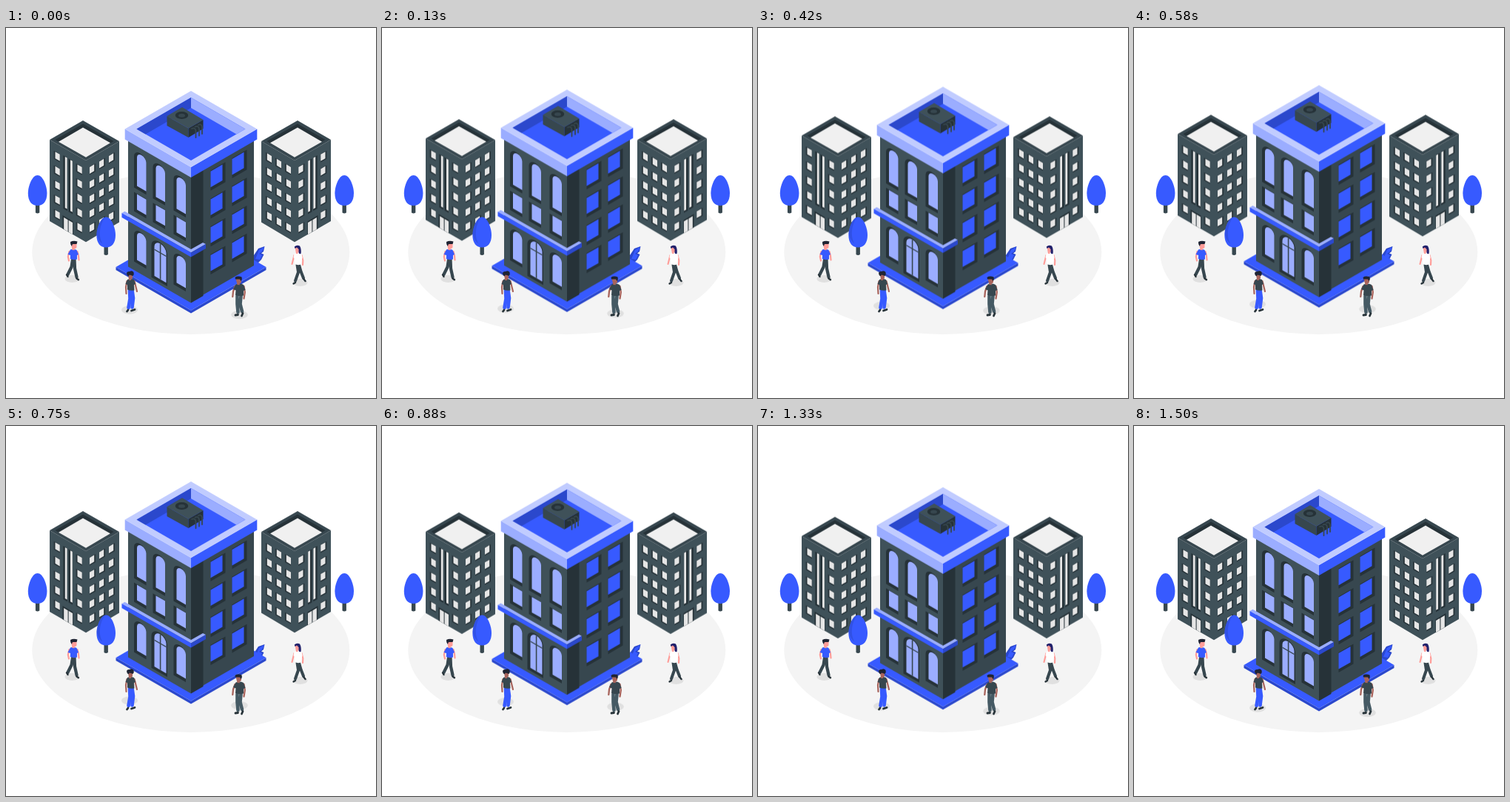
An HTML page for the animation above (1.54 s loop, 500 by 500 pixels).

```html
<!DOCTYPE html>
<html lang="en">
<head>
<meta charset="utf-8">
<title>City block</title>
<style>
  html, body { margin: 0; width: 100%; height: 100%; overflow: hidden; background: #fff; }
  svg { display: block; width: 100%; height: 100%; }
  #float { animation: float 1540ms linear infinite; }
  @keyframes float {
    0%, 97.4%, 100% { transform: translateY(0); }
    48.7% { transform: translateY(-10px); }
  }
  .blue { fill: #375aff; }
  .navy { fill: #2b48cc; }
  .pale { fill: #c1ccff; }
  .soft { fill: #9badff; }
  .wall { fill: #37474f; }
  .stone { fill: #3f5159; }
  .dark { fill: #263238; }
  .glass { fill: #e6e6e6; }
  .roof { fill: #f0f0f0; }
  .shade { fill: #e0e0e0; }
  .pink { fill: #ff9c98; }
  .tan { fill: #a8645c; }
  .white { fill: #fff; }
  .hair { fill: #1f2433; }
  .limb { fill: none; stroke-linecap: round; stroke-linejoin: round; }
</style>
</head>
<body>
<svg viewBox="0 0 500 500">
  <defs>
    <g id="tree">
      <path class="wall" d="M-2.700 30h5.400v20.500q-2.700 2-5.400 0z"/>
      <path class="blue" d="M0 0C7 0 12.800 14 12.800 24.500C12.800 35.500 7.500 41 0 41S-12.800 35.500-12.800 24.500C-12.800 14-7 0 0 0z"/>
    </g>
  </defs>

  <ellipse cx="249.800" cy="303" rx="214.500" ry="111" fill="#f4f4f4"/>
  <use href="#tree" x="42.600" y="199"/>
  <use href="#tree" x="457.200" y="199"/>
  <path class="navy" d="M335 318V307L341 298L349.500 295L348 302L345 304.500L348.500 306L345 313L340 318z"/>
  <path class="blue" d="M337 312L342 300L349 296L346 302L342 305L346 307L343 313z"/>

  <g id="float">
    <ellipse class="shade" cx="167" cy="381" rx="11" ry="5.700"/>
    <ellipse class="shade" cx="315.500" cy="387.500" rx="11.300" ry="5.700"/>
    <g id="west"></g>
    <g id="east" transform="translate(498) scale(-1 1)"></g>

    <path class="navy" d="M148.500 323L250 381.500L351.500 323V327L250 385.500L148.500 327z"/>
    <path class="blue" d="M148.500 323L250 264.500L351.500 323L250 381.500z"/>
    <path class="stone" d="M165 150L250 199V371.500L165 322.500z"/>
    <path class="wall" d="M250 199L335 150V321L250 370z"/>
    <path class="dark" d="M250 199L266.500 189.500V362L250 371.500z"/>
    <g id="front" transform="matrix(1 .577 0 1 165 152)"></g>
    <g id="side" transform="matrix(1 -.577 0 1 250 201)"></g>

    <path class="soft" d="M156.500 250L160.500 247.700L250 299L266 290L270 292L250 303.500z"/>
    <path class="blue" d="M156.500 250L250 303.500V309.500L156.500 256z"/>
    <path class="navy" d="M250 303.500L270 292V298L250 309.500z"/>

    <path class="soft" d="M160.700 136.500L250 188V202L160.700 150.500z"/>
    <path class="blue" d="M250 188L339.300 136.500V150.500L250 202z"/>
    <path class="pale" d="M250 85L339.300 136.500L250 188L160.700 136.500z"/>
    <path class="blue" d="M250 94L323.500 136.500L250 179L176.500 136.500z"/>
    <path class="navy" d="M250 94V108L188.600 143.500L176.500 136.500z"/>
    <path class="soft" d="M250 94L323.500 136.500L311.400 143.500L250 108z"/>

    <path class="wall" d="M217.500 119L246.500 135.500V148L217.500 132z"/>
    <path class="dark" d="M246.500 135.500L266.500 124V136L246.500 148z"/>
    <path class="stone" d="M238 107L266.500 124L246.500 135.500L217.500 119z"/>
    <ellipse class="dark" cx="237.500" cy="118" rx="8.700" ry="5"/>
    <ellipse class="wall" cx="237.500" cy="118.300" rx="4.500" ry="2.500"/>
    <path class="limb" stroke="#37474f" stroke-width="1.800"
      d="M251 136q5-2 5.500 3v9M255.500 133.500q5-2 5.500 3v9M260 131q4.500-2 5 3v9"/>
  </g>

  <use href="#tree" x="135.200" y="255.500"/>
  <path class="navy" d="M134 255.700C127 258 123 270 122.600 278C124 285 128 290 130 291C124 280 127 264 134 255.700z" opacity=".5"/>

  <g>
    <ellipse class="shade" cx="89.500" cy="339" rx="10" ry="5"/>
    <path class="limb" stroke="#ff9c98" stroke-width="2.200" d="M85.500 302L83.800 309L85 314.500M96.500 302L98 308L98.500 313.500"/>
    <path class="limb" stroke="#37474f" stroke-width="4.200" d="M90 313L88.500 323L83.500 333M92.500 313L93 325L95.500 336.500"/>
    <path class="limb" stroke="#263238" stroke-width="2.400" d="M82 333.500L83.500 336M95.500 338.500L98 340.200"/>
    <path class="blue" d="M87 299.500Q91 298 95.500 300L98 306L96 307V312.500Q91 314 86.800 312L87 307L83.500 306z"/>
    <path class="pink" d="M88 291h7.500v5.500q-1 2-2.800 1.800v2l-3.200-.3z"/>
    <path class="hair" d="M87 289Q91 287 96.500 288.500L95.500 292H90L88.800 295Q86.500 292 87 289z"/>
  </g>

  <g>
    <path class="limb" stroke="#a8645c" stroke-width="2.200" d="M163.500 342L162 350L162.500 359M173.500 342L175.300 349L177 356"/>
    <path class="limb" stroke="#375aff" stroke-width="4.600" d="M167 354L167.500 366L165.500 378M170.500 354L172 365L170.500 377.500"/>
    <path class="limb" stroke="#263238" stroke-width="2.800" d="M165 381L163.500 383M169.500 382L174 380.500"/>
    <path class="wall" d="M164 340Q168 338 173 340L175 346L173 347L173.500 354.500Q168 355.500 164 353.500L164 347L161.500 346z"/>
    <path class="tan" d="M165 333h6v5q-.8 1.500-2 1.500v1.500h-2.800z"/>
    <path class="hair" d="M163 331Q164 328.500 167 329Q170.500 327 172.500 330Q173.500 333 171.500 335L167 333.500L165.500 335.500Q163 334 163 331z"/>
  </g>

  <g>
    <path class="limb" stroke="#a8645c" stroke-width="2.300" d="M309.500 349L307 356L306.300 363M321.500 349L322.800 357L321.500 365.500"/>
    <path class="limb" stroke="#455a64" stroke-width="4.600" d="M312.500 362L312.500 373L313.500 384M317.500 362L316.500 373L319 383"/>
    <path class="limb" stroke="#263238" stroke-width="2.800" d="M313.500 387.500L310 388M320 385.500L318.500 389"/>
    <path class="wall" d="M310.500 346.500Q316 344.500 321 347L323.500 354L321 355V361.500Q315 363 310 361L310.500 354.500L307 353z"/>
    <path class="tan" d="M310.500 338.500h7.500v5q-.8 1.800-2.200 1.800v2l-3.300-.3z"/>
    <path class="hair" d="M309.500 337Q313 334.500 318.500 336.500Q319.500 340 317.500 342L316 339.500L310 339.500z"/>
  </g>

  <g>
    <ellipse class="shade" cx="397.500" cy="344" rx="10" ry="5"/>
    <path class="limb" stroke="#ff9c98" stroke-width="2.100" d="M389.500 307L388 313L386.500 319M399.500 307L401.300 314L401 320"/>
    <path class="limb" stroke="#37474f" stroke-width="4" d="M393.500 320L395 330L391 341.500M396 320L398.500 329L402 338"/>
    <path class="limb" stroke="#263238" stroke-width="2.400" d="M391 344L388.500 345.500M402.500 339.500L404.500 342"/>
    <path class="white" d="M389.500 305Q394 303 399.500 305L400.500 310L398.500 319.500Q394 321 390.200 319L390 312L388.500 310z"/>
    <path class="pink" d="M390.500 296h6v5.500q-1 1.500-2 1.500v2h-2.500z"/>
    <path fill="#20206b" d="M389.800 295.500Q393 292.500 397 294.500Q399.500 299 398.500 305Q396 306 395.500 303.500L395.500 299L393 296.500L390.500 298z"/>
  </g>
</svg>

<script>
  const fill = (id, parts) => { document.getElementById(id).innerHTML = parts.join(''); };
  const rect = (cls, x, y, w, h) => `<path class="${cls}" d="M${x} ${y}h${w}v${h}h${-w}z"/>`;
  const arch = (cls, x, y, w, h) => {
    const r = w / 2;
    return `<path class="${cls}" d="M${x} ${y + h}V${y + r}a${r} ${r} 0 0 1 ${w} 0V${y + h}z"/>`;
  };
  const grid = (cols, rows, draw) => cols.flatMap(x => rows.map(y => draw(x, y)));
  const steps = (start, gap, n) => Array.from({ length: n }, (_, i) => start + gap * i);

  // Side block: strips and door on one wall, a window grid on the other.
  function block(id) {
    const rows = steps(11.5, 19.7, 5);
    const pane = jamb => (x, y) =>
      rect('dark', x - (jamb < 0 ? 1.8 : 0), y, 8, 11) + rect('glass', x, y + .3, 6.2, 9);
    fill(id, [
      '<path class="stone" d="M59 151L108 179V289.300L59 261z"/>',
      '<path class="stone" d="M108 179L153 153V262.500L108 289.300z"/>',
      '<path class="wall" d="M104 125L153 153L108 179L59 151z"/>',
      '<path class="dark" d="M104 129.500L145.500 153L108 174.700L66.500 151z"/>',
      '<path class="roof" d="M104 134.500L141 155.300L108 174.700L71 153.700z"/>',
      '<g transform="matrix(1 .577 0 1 59 151)">',
      ...grid([7.5, 37.5], rows, pane(-1)),
      ...[20.8, 28].map(x => rect('dark', x - 2.5, 10.5, 5.5, 72) + rect('glass', x, 11, 2.8, 69)),
      rect('dark', 17.5, 92, 14, 18),
      ...[19.2, 25.6].map(x => rect('glass', x, 94, 5.4, 16)),
      '</g><g transform="matrix(1 -.577 0 1 108 179)">',
      ...grid([5, 18, 31], rows, pane(1)),
      '</g>'
    ]);
  }
  block('west');
  block('east');

  const cols = [8, 33.5, 61.5];
  const tall = (y, h) => x => arch('dark', x, y, 16.5, h) + arch('soft', x + 4, y + 1.5, 12.5, h - 6);
  fill('front', [
    ...cols.map(tall(8, 51)),
    ...grid(cols, [65], (x, y) => rect('dark', x, y, 16.5, 26) + rect('soft', x + 4, y + .5, 12.5, 21)),
    ...[cols[0], cols[2]].map(tall(114, 45)),
    arch('dark', 31.5, 112.5, 21.5, 54),
    arch('soft', 35.5, 114.5, 16, 48),
    rect('wall', 42.8, 114.5, 1.6, 48),
    rect('wall', 35.5, 126, 16, 1.6)
  ]);
  fill('side', grid([26.5, 55.5], steps(7, 37.8, 4), (x, y) =>
    rect('dark', x, y, 20, 27) + rect('blue', x, y + 1, 16, 21.5)));
</script>
</body>
</html>
```
